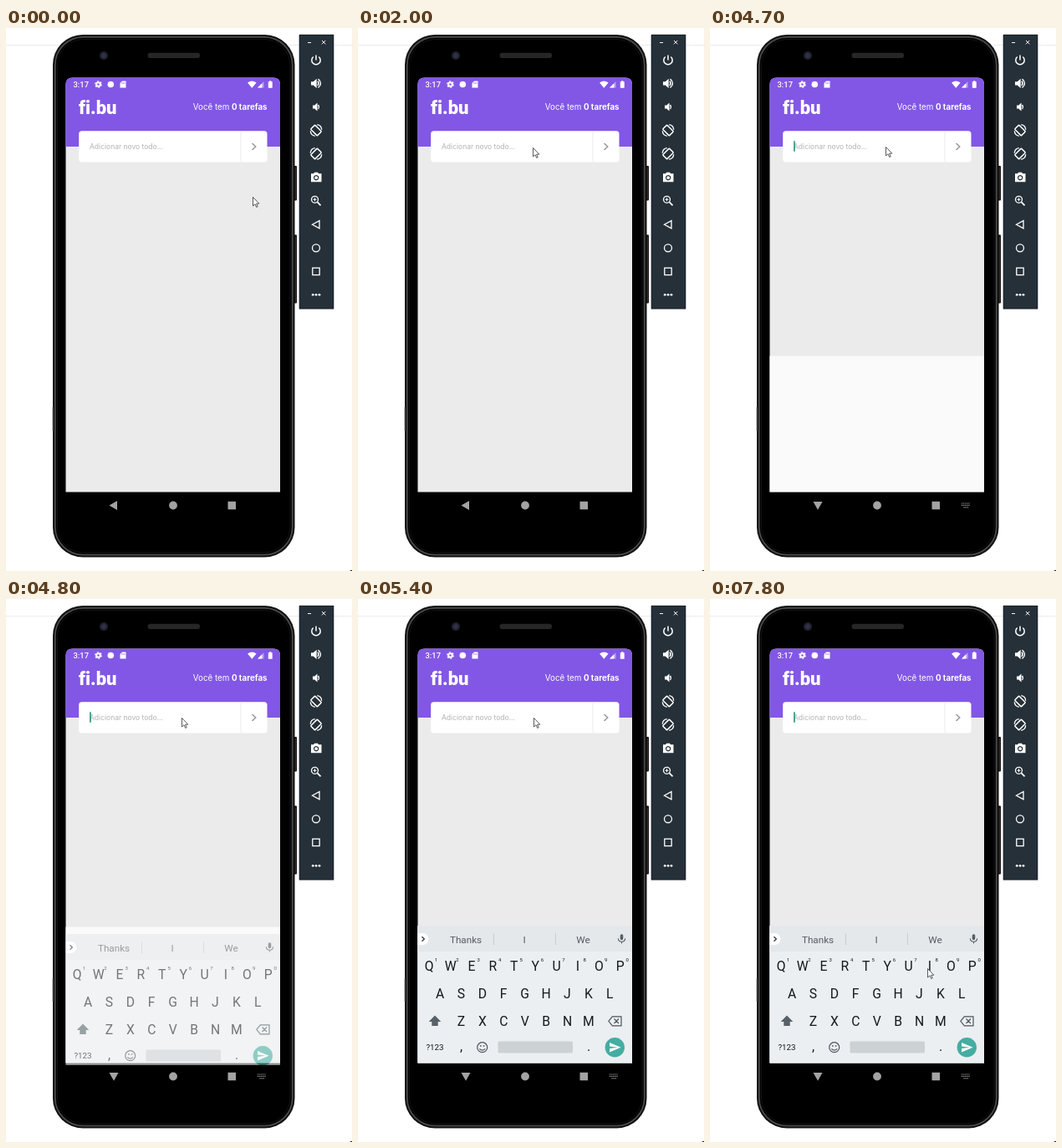
Animation of 414x650 px, one loop 8000 ms. Source, as an HTML page:

```html
<!DOCTYPE html>
<html lang="pt">
<head>
<meta charset="utf-8">
<title>Lista de tarefas</title>
<style>
html, body { margin: 0; width: 100%; height: 100%; overflow: hidden; background: #fff; }
svg { display: block; }
text { font-family: Roboto, sans-serif; font-variant-ligatures: none; }
.inter { font-family: Inter, sans-serif; }
.mid { text-anchor: middle; }
.line { fill: none; stroke: #fff; stroke-width: 1.3; }
.key { fill: #15191c; font-size: 15.7px; }
.word { fill: #565c60; font-size: 11.7px; }
.slate { fill: #566168; }
</style>
</head>
<body>
<svg width="414" height="650" viewBox="0 0 414 650">
  <defs>
    <clipPath id="kbClip"><rect x="71.500" y="385" width="256.500" height="173"/></clipPath>
    <clipPath id="screenClip"><path d="M71.500 555.500V67.500q0-8 8-8H320q8 0 8 8V555.500Z"/></clipPath>
    <g id="rotate">
      <rect x="-3.600" y="-5.500" width="7.200" height="11" rx=".8" transform="rotate(-45)" stroke-width="1.500"/>
      <path d="M-6.700.800q.3 5.200 5.500 6M6.700-.800q-.3-5.200-5.500-6"/>
    </g>
  </defs>
  <rect width="414" height="650" fill="#fff"/>
  <rect y="20" width="414" height="1" fill="#ededed"/>
  <rect x="412" y="649" width="2" height="1" fill="#222"/>

  <!-- phone body -->
  <g fill="#141414">
    <rect x="343" y="165" width="5" height="41.500" rx="1"/>
    <rect x="343" y="247.500" width="5" height="82" rx="1"/>
    <path d="M346.500 167v38M346.500 250v78" stroke="#35322f"/>
  </g>
  <rect x="56" y="8" width="289.500" height="625.500" rx="36" fill="#0e0e0e"/>
  <rect x="58.800" y="10.800" width="283.900" height="619.900" rx="33.500" fill="#000" stroke="#4a4b4d" stroke-width="1.800"/>
  <rect x="61.500" y="13.500" width="278.500" height="614.500" rx="31" fill="#000" stroke="#141414"/>
  <rect x="55.500" y="454" width="1" height="28" fill="#777"/>
  <circle cx="117" cy="33" r="5" fill="#22232a"/>
  <circle cx="117" cy="33" r="2.700" fill="#30324d"/>
  <rect x="169.500" y="29.800" width="62.500" height="6.200" rx="3" fill="#262626"/>

  <!-- app -->
  <g clip-path="url(#screenClip)">
    <rect x="71" y="59" width="258" height="497" fill="#ebebeb"/>
    <rect x="71" y="59" width="258" height="83" fill="#8257e5"/>
    <rect id="blank" x="71" y="392.500" width="258" height="163" fill="#fafafa"/>
  </g>
  <g fill="#fff">
    <text x="80.500" y="71" font-size="9.400" font-weight="500">3:17</text>
    <circle cx="110.500" cy="67.500" r="2.300" fill="none" stroke="#fff" stroke-width="2"/>
    <circle cx="110.500" cy="67.500" r="3.700" fill="none" stroke="#fff" stroke-width="1.300" stroke-dasharray="1.900 1.970"/>
    <circle cx="125.300" cy="67.500" r="3.800"/>
    <path d="M139 63.500h4.500v8h-7v-5.500Z"/>
    <path d="M138.600 65.200v1.600m1.600-1.600v1.600m1.600-1.600v1.600" stroke="#8257e5" stroke-width=".7"/>
    <path d="M289 65.500q5.300-4.200 10.600 0L294.300 71.800Z"/>
    <path d="M301 71.500 308.500 64V71.500Z" opacity=".45"/>
    <path d="M301 71.500 306.300 66.200V71.500Z"/>
    <path d="M313.800 64.300h1.300v-1h2.300v1h1.300v7.400h-4.900Z"/>
    <text x="87" y="103" font-size="22" font-weight="900">fi.bu</text>
    <text class="inter" x="312.500" y="97.500" font-size="9.750" text-anchor="end">Você tem <tspan font-weight="700">0 tarefas</tspan></text>
    <rect x="87.200" y="123.300" width="225.300" height="37.300" rx="3.500"/>
  </g>
  <rect x="280.500" y="123.500" width="1" height="37" fill="#ebebeb"/>
  <path d="M294.500 138 298.700 142 294.500 146" fill="none" stroke="#999" stroke-width="1.500"/>
  <text class="inter" x="100" y="145" font-size="8.500" fill="#b3b3b3">Adicionar novo todo...</text>
  <rect id="caret" x="100.200" y="135.300" width="1.500" height="12.500" fill="#168a7c"/>

  <!-- navigation bar -->
  <g fill="#a3a3a3">
    <path id="back" d="M123.500 571.500 133 566V577Z"/>
    <path id="down" d="M123.500 567H134.500L129 576.800Z"/>
    <circle cx="200" cy="571.500" r="4.900"/>
    <rect x="265.500" y="566.800" width="9.500" height="9.500"/>
    <path id="kbIcon" d="M301 569h10.500M301 571.300h10.500M303.500 573.800h5.500" stroke="#a3a3a3" stroke-width="1.200" stroke-dasharray="1.200 .9"/>
  </g>

  <!-- keyboard -->
  <g clip-path="url(#kbClip)">
    <g id="board">
      <rect x="71" y="391" width="257.500" height="164.500" fill="#eceff1"/>
      <rect x="71" y="391" width="257.500" height="31" fill="#e4e8eb"/>
      <path d="M71 400h6.500a7 7 0 0 1 0 14H71Z" fill="#fff"/>
      <path d="M76.500 404.300 79.300 407 76.500 409.700" fill="none" stroke="#333" stroke-width="1.300"/>
      <path d="M162.500 400v14M236.500 400v14" stroke="#c8cdd1"/>
      <g class="mid">
        <text class="word" x="129" y="411.500">Thanks</text>
        <text class="word" x="199" y="411.500">I</text>
        <text class="word" x="269.500" y="411.500">We</text>
      </g>
      <g class="slate">
        <rect x="313.700" y="401.300" width="3.600" height="7" rx="1.800"/>
        <path d="M311.300 406.300q.2 4 4.200 4t4.200-4M315.500 410v2.500" fill="none" stroke="#566168" stroke-width="1.100"/>
        <path d="M92 498.500 99.300 506H95.700V511H88.300V506H84.700Z"/>
      </g>
      <g id="keys" class="mid"></g>
      <g fill="none" stroke="#4a555c" stroke-width="1.200">
        <path d="M299.800 505.300 304.300 499.800H315V510.800H304.300ZM306.500 502.500l5.500 5.500m0-5.500-5.500 5.500"/>
        <circle cx="148.700" cy="536.700" r="6"/>
        <path d="M145.300 538.300q3.400 3.800 6.800 0"/>
      </g>
      <path d="M145.900 534.300h1.800v1.500h-1.800ZM149.700 534.300h1.800v1.500h-1.800Z" class="slate"/>
      <rect x="167.500" y="529.500" width="89.500" height="14" rx="1.500" fill="#ccd1d4"/>
      <circle cx="307.300" cy="536.700" r="11.700" fill="#45ada2"/>
      <path d="M2 21 23 12 2 3V10L17 12 2 14Z" transform="translate(299.800 529) scale(.64)" fill="#fff"/>
    </g>
  </g>

  <!-- emulator toolbar -->
  <rect x="350.700" y="7.800" width="41.600" height="328.700" fill="#151c21"/>
  <rect x="351.700" y="8.800" width="39.600" height="326.700" fill="#263038"/>
  <g class="line">
    <path d="M361 17.500h4M378 15l4.300 4.300m0-4.300L378 19.300" stroke-width="1"/>
    <path d="M367.700 34.500a5.200 5.200 0 1 0 6.600 0M371 32.500v6" stroke-width="1.500"/>
    <path d="M373 63.500q2 2.800 0 5.600M373.500 61q6 5.300 0 10.600" stroke-width="1.400"/>
    <path d="M373.500 92q1.800 2.500 0 5"/>
    <use href="#rotate" transform="translate(371 122.500)"/>
    <use href="#rotate" transform="translate(371 150.500) scale(-1 1)"/>
    <circle cx="369.500" cy="205.300" r="4"/>
    <path d="M372.500 208.300 376.500 212.300" stroke-width="1.700"/>
    <path d="M367.500 205.300h4M369.500 203.300v4" stroke-width="1"/>
    <path d="M366.500 235.300 375 230.700V239.900Z"/>
    <circle cx="371" cy="263.300" r="4.500"/>
    <rect x="366.800" y="287.200" width="8.400" height="8.400"/>
  </g>
  <g fill="#fff">
    <path d="M365 64.300h2.700L371.700 60.700V72L367.700 68.400H365ZM367 92.600h2.300L372.500 89.500V99.500L369.300 96.400H367Z"/>
    <path fill-rule="evenodd" d="M365 174.300h3L369.300 172.700h3.600L374.200 174.300h3.300V184.300H365ZM371.200 176a3.200 3.200 0 1 0 .01 0Z"/>
    <circle cx="371.200" cy="179.200" r="1.900"/>
    <circle cx="367.200" cy="319.300" r="1.400"/><circle cx="371.100" cy="319.300" r="1.400"/><circle cx="375" cy="319.300" r="1.400"/>
  </g>

  <path id="pointer" d="M.5.500V11L3 8.800 4.700 12.500 6.200 11.800 4.600 8.200H7.800Z" fill="#fff" stroke="#333" stroke-width=".8"/>
</svg>
<script>
const LOOP = 8000, TICK = 100;
const $ = id => document.getElementById(id);

function label(str, x, y, size) {
  const el = document.createElementNS("http://www.w3.org/2000/svg", "text");
  el.setAttribute("class", "key");
  el.setAttribute("x", x);
  el.setAttribute("y", y);
  if (size) el.style.fontSize = size + "px";
  el.textContent = str;
  $("keys").append(el);
}

const PITCH = 25.4;
[["QWERTYUIOP", 85.2, 444.5], ["ASDFGHJKL", 98, 477.5], ["ZXCVBNM", 123.5, 510.5]].forEach(([row, x, y]) =>
  [...row].forEach((c, i) => label(c, x + i * PITCH, y)));
for (let i = 0; i < 10; i++) label((i + 1) % 10, 93.5 + i * PITCH, 433.5, 6);
label("?123", 92, 540.2, 9.8);
label(",", 123.5, 541);
label(".", 276, 541);

// time, x, y of the pointer tip
const path = [
  [0, 295, 202], [900, 295, 202], [1200, 353, 174], [1400, 353, 174],
  [2000, 209, 143], [3300, 209, 143], [3400, 211, 140], [3600, 213, 137],
  [4000, 210, 142], [5600, 210, 142], [5700, 180, 215], [5800, 117, 357],
  [5900, 150, 472], [6200, 150, 472], [6400, 264, 480], [6600, 264, 480],
  [7400, 270, 486], [7500, 270, 486], [7800, 260, 442], [LOOP, 260, 442]
];
const blinks = [4500, 5000, 5500, 6100, 6600, 7100, 7600];

function pointerAt(t) {
  const i = path.findIndex(p => p[0] > t);
  const [t0, x0, y0] = path[i - 1], [t1, x1, y1] = path[i];
  const k = (t - t0) / (t1 - t0);
  return [x0 + (x1 - x0) * k, y0 + (y1 - y0) * k];
}

const show = (id, on) => $(id).setAttribute("visibility", on ? "visible" : "hidden");

function draw(time) {
  const t = Math.floor(time % LOOP / TICK) * TICK;
  const open = t >= 4700;
  const rise = Math.max(0, Math.min(1, (t - 4700) / 300));
  $("pointer").setAttribute("transform", `translate(${pointerAt(t)})`);
  show("caret", blinks.filter(b => b <= t).length % 2);
  show("blank", open);
  show("back", !open);
  show("down", open);
  show("kbIcon", open);
  show("board", rise > 0);
  $("board").setAttribute("transform", `translate(0 ${22.5 * (1 - rise) ** 2})`);
  $("board").setAttribute("opacity", 1 - (1 - rise) ** 2.2);
}

function frame() {
  draw(performance.now());
  requestAnimationFrame(frame);
}
frame();
</script>
</body>
</html>
```
